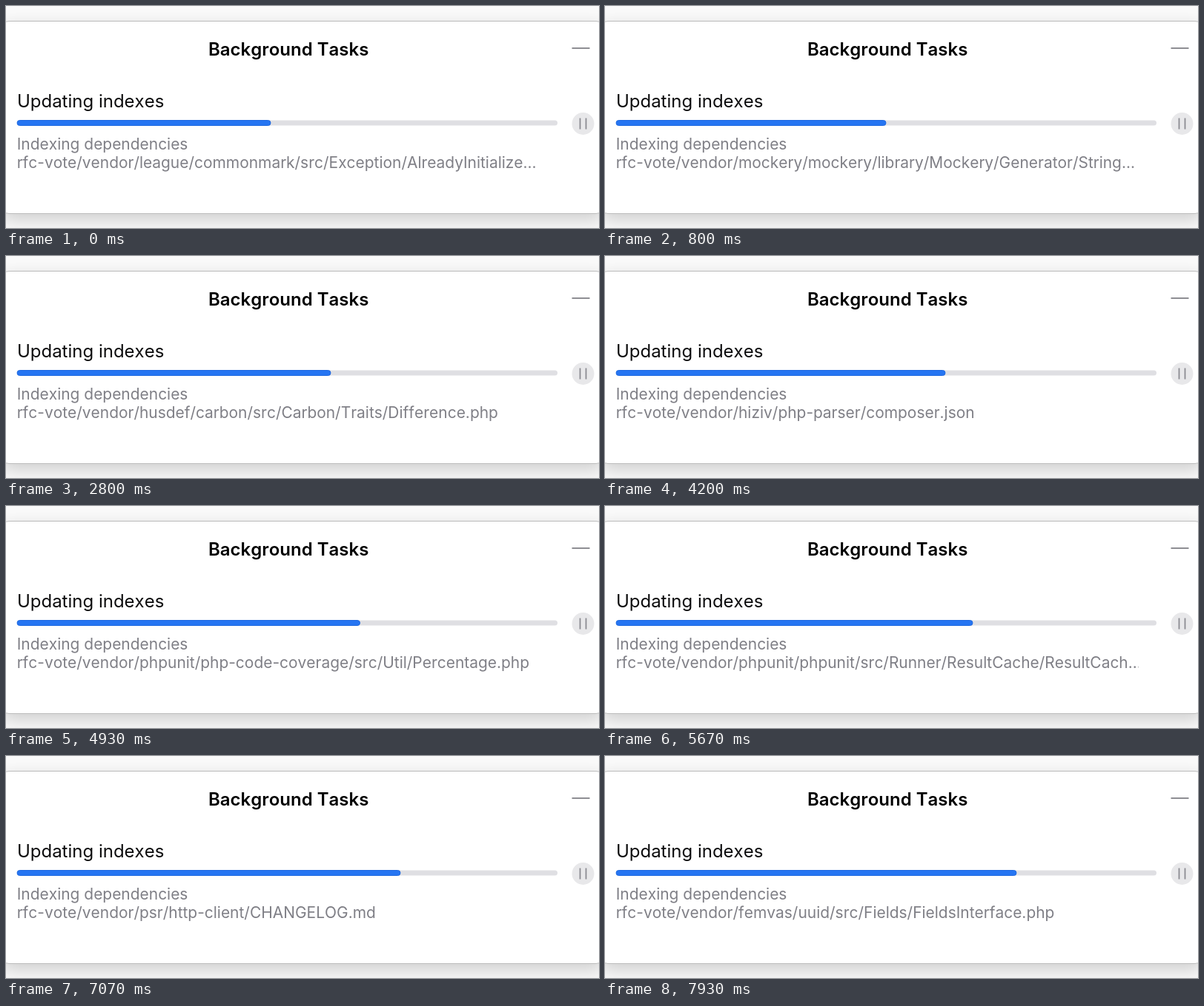
An HTML page that plays this animation: 800 by 300 pixels, repeating every 8000 ms.

```html
<!DOCTYPE html>
<html lang="en">
<head>
<meta charset="utf-8">
<title>Background Tasks</title>
<style>
  html, body { margin: 0; width: 100%; height: 100%; overflow: hidden; background: #fafafa; }
  .stage { position: relative; width: 800px; height: 300px; overflow: hidden; }
  .window {
    position: absolute; left: -6px; top: 20px; width: 812px; height: 261px;
    box-sizing: border-box; border: 1px solid #bcbcbc; border-radius: 10px;
    background: #fff; box-shadow: 0 8px 24px rgba(0, 0, 0, .18);
  }
  svg { position: absolute; left: 0; top: 0; }
  text {
    font: 24px Inter, sans-serif;
    font-optical-sizing: none; font-kerning: none; fill: #0b0b0c;
  }
  .title { font-weight: 600; fill: #000; }
  .detail { font-size: 20.95px; fill: #7f7f86; }
</style>
</head>
<body>
<div class="stage">
  <div class="window"></div>
  <svg width="800" height="300" viewBox="0 0 800 300">
    <clipPath id="textArea"><rect x="0" y="170" width="720" height="60"/></clipPath>
    <text class="title" x="272.9" y="67">Background Tasks</text>
    <path d="M763.5 57H787.5" stroke="#8e8e93" stroke-width="2"/>
    <text x="14.9" y="136.5">Updating indexes</text>
    <rect x="15" y="154.5" width="729" height="7" rx="3.5" fill="#dfdfe3"/>
    <rect id="bar" x="15" y="154.5" width="342" height="7" rx="3.5" fill="#2675f2" stroke="#1f69e0"/>
    <circle cx="778.5" cy="159" r="15" fill="#e8e8ea"/>
    <path d="M774.5 151.5V166.5M782.5 151.5V166.5" stroke="#8c8c92" stroke-width="1.8"/>
    <text class="detail" x="14.7" y="193.8">Indexing dependencies</text>
    <g clip-path="url(#textArea)"><text id="path" class="detail" x="14.7" y="219.2"></text></g>
  </svg>
</div>
<script>
const LOOP = 8000, FPS = 15, MAX_CHARS = 68;

// Each line: a directory, then its files, one per step; "=" holds the previous step.
const tree = `
league/commonmark/src/ Exception/AlreadyInitializedException.php Extension/Attributes/Util/AttributesHelper.php Extension/CommonMark/Node/Inline/Strong.php Extension/FrontMatter/FrontMatterParser.php Extension/TableOfContents/Node/TableOfContents.php Parser/Cursor.php Util/RegexHelper.php
league/ config/README.md flysystem/src/Filesystem.php flysystem/src/UnixVisibility/VisibilityConverter.php mime-type-detection/src/FinfoMimeTypeDetector.php
mockery/mockery/ docs/cookbook/mocking_hard_dependencies.rst library/Mockery/Generator/String... library/Mockery/Matcher/AnyOf.php library/Mockery/Mock.php
monolog/monolog/src/Monolog/ Formatter/LineFormatter.php Handler/BufferHandler.php Handler/FingersCrossedHandler.php Handler/Slack/SlackRecord.php Handler/StreamHandler.php Processor/WebProcessor.php
myclabs/deep-copy/ README.md src/DeepCopy/DeepCopy.php src/DeepCopy/Filter/SetNullFilter.php
husdef/carbon/src/Carbon/ Carbon.php CarbonPeriod.php Lang/af.php = Lang/bg_BG.php Lang/de_AT.php Lang/en_GB.php Lang/es_MX.php Lang/fr_CA.php Lang/hu.php Lang/it_IT.php Lang/ko.php Lang/nb_NO.php Lang/pt_BR.php Lang/sr_Latn.php Lang/uz_Cyrl.php Lang/zh_TW.php Traits/Converter.php Traits/Difference.php = Traits/Macro.php Traits/Units.php
nette/schema/src/Schema/ Elements/Structure.php Processor.php
nette/utils/src/ = Utils/Arrays.php Utils/DateTime.php Utils/Html.php Utils/Reflection.php Utils/Validators.php compatibility.php exceptions.php
hiziv/php-parser/ bin/php-parse lib/PhpParser/Builder/Class_.php = lib/PhpParser/Lexer/Emulative.php lib/PhpParser/Node/Expr/Array_.php lib/PhpParser/NodeTraverser.php README.md composer.json =
phar-io/ manifest/src/ManifestLoader.php version/src/Version.php
phpoption/phpoption/src/ PhpOption/Option.php
phpunit/php-code-coverage/src/ CodeCoverage.php Driver/XdebugDriver.php Node/Directory.php = Report/Clover.php Report/Html/Renderer.php Util/Percentage.php
phpunit/ php-file-iterator/src/Facade.php php-timer/src/Timer.php
phpunit/phpunit/src/ Event/Emitter/DispatchingEmitter.php Event/Events/Test/Lifecycle/Prepared.php Framework/Assert.php Framework/Constraint/IsEqual.php Framework/MockObject/MockBuilder.php Framework/TestCase.php Metadata/Parser/AttributeParser.php Runner/Filter/Factory.php Runner/ResultCache/ResultCacheHandler.php Runner/TestSuiteLoader.php TextUI/Application.php TextUI/Configuration/Configuration.php TextUI/Output/Default/ResultPrinter.php Util/Color.php Util/PHP/JobRunner.php = Util/Xml/Loader.php Util/Filter.php
psr/ cache/src/CacheItemInterface.php clock/src/ClockInterface.php container/src/ContainerInterface.php event-dispatcher/src/StoppableEventInterface.php = event-dispatcher/composer.json event-dispatcher/README.md
psr/http-client/ src/ClientExceptionInterface.php src/ClientInterface.php composer.json README.md CHANGELOG.md
psr/ http-factory/src/UriFactoryInterface.php http-message/src/StreamInterface.php log/src/LoggerTrait.php simple-cache/src/CacheInterface.php
psy/psysh/src/ CodeCleaner.php Command/ListCommand.php Shell.php
femvas/collection/src/ AbstractCollection.php Map/TypedMap.php Queue.php
femvas/uuid/src/ Builder/DefaultUuidBuilder.php Codec/StringCodec.php Fields/FieldsInterface.php
`;

// Step and right end of the bar, linear in between
const progress = [[0, 357], [12, 379], [42, 438], [63, 459], [85, 496], [106, 532], [119, 555]];

function barEnd(step) {
  const i = Math.max(1, progress.findIndex(([s]) => s >= step));
  const [s0, x0] = progress[i - 1], [s1, x1] = progress[i];
  return x0 + (x1 - x0) * (step - s0) / (s1 - s0);
}

function shorten(path) {
  return path.length > MAX_CHARS ? path.slice(0, MAX_CHARS - 3) + '...' : path;
}

const steps = [];
for (const line of tree.trim().split('\n')) {
  const [dir, ...files] = line.split(' ');
  for (const file of files) {
    steps.push(file === '='
      ? steps[steps.length - 1]
      : { path: shorten('rfc-vote/vendor/' + dir + file), end: barEnd(steps.length) });
  }
}

const bar = document.getElementById('bar');
const label = document.getElementById('path');
let shown;

function draw(time) {
  // Step times are rounded to 10 ms, so allow a few ms of slack
  const n = Math.floor((time % LOOP + 4) * FPS / 1000);
  const step = steps[Math.min(n, steps.length - 1)];
  if (step !== shown) {
    shown = step;
    label.textContent = step.path;
    bar.setAttribute('width', step.end - 15);
  }
}

const start = performance.now();
function tick() {
  draw(performance.now() - start);
  requestAnimationFrame(tick);
}
tick();
</script>
</body>
</html>
```
